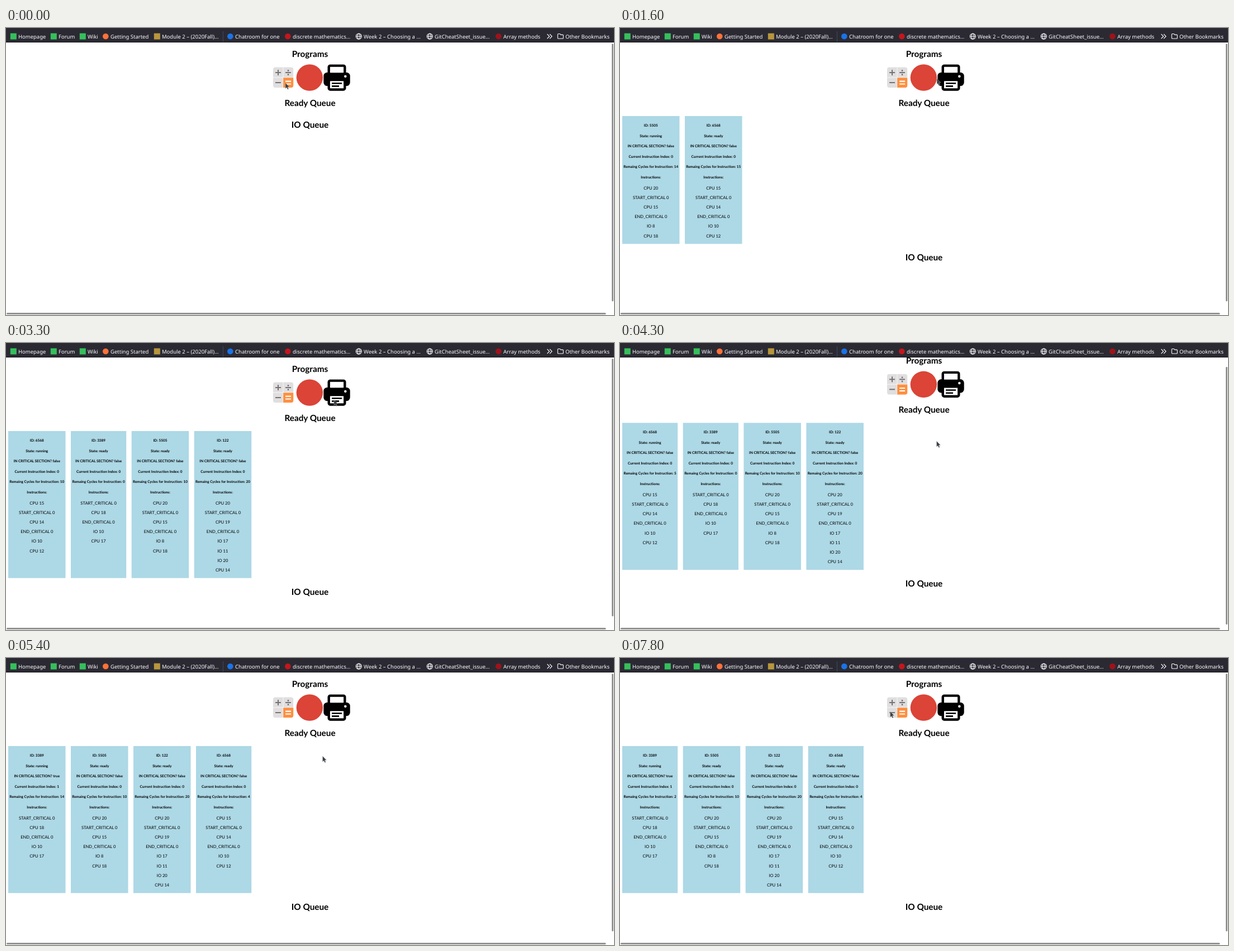
Recreate the animation shown at these times as an HTML page. Size 1088x515 px, loop 8000 ms.

```html
<!DOCTYPE html>
<html lang="en">
<head>
<meta charset="utf-8">
<title>Process queues</title>
<style>
  html, body { margin: 0; width: 100%; height: 100%; overflow: hidden; background: #fff; }
  svg { display: block; width: 1088px; height: 515px; text-rendering: geometricPrecision; }
  #page { font-family: Lato, "Noto Sans", sans-serif; text-anchor: middle; }
  .head { font-size: 15.3px; font-weight: 700; }
  .info { font-size: 6.45px; font-weight: 700; }
  .code { font-size: 7.6px; }
  #bar text { font: 9.5px "Noto Sans", sans-serif; fill: #fbfbfe; }
  .line { fill: none; stroke: #fbfbfe; stroke-width: 1.1; }
  .sheet { fill: #fff; stroke: #000; stroke-width: 4.4; }
</style>
</head>
<body>
<svg viewBox="0 0 1088 515">
  <defs>
    <rect id="square" x="-5.5" y="-5.5" width="11" height="11"/>
    <circle id="dot" r="5.3"/>
    <g id="globe" class="line">
      <circle r="5"/><ellipse rx="2.2" ry="5"/><path d="M-5 0H5"/>
    </g>
    <path id="folder" class="line" d="M-5-3.5a1 1 0 0 1 1-1h3l1.3 1.6H4a1 1 0 0 1 1 1V3a1 1 0 0 1-1 1H-4a1 1 0 0 1-1-1Z"/>
    <clipPath id="keys"><rect x="478" y="70.5" width="36.2" height="36.6" rx="4"/></clipPath>
  </defs>

  <g id="page">
    <text class="head" x="544" y="51.8">Programs</text>
    <!-- calculator -->
    <g clip-path="url(#keys)">
      <rect x="478" y="70" width="37" height="38" fill="#e0dede"/>
      <path d="M496 70V108M478 88.9H515" stroke="#fff" stroke-width=".8"/>
      <rect x="496.2" y="89.2" width="19" height="19" fill="#ff8f3f"/>
    </g>
    <path d="M482 80H492M487 75V85M500 80H510M482 98H492" stroke="#737373" stroke-width="2"/>
    <path d="M505 75.1V77.7M505 82.3V84.9" stroke="#737373" stroke-width="2.4"/>
    <path d="M500 95.7H510M500 100.5H510" stroke="#fff" stroke-width="2.2"/>
    <!-- browser -->
    <circle cx="543.3" cy="89" r="23.7" fill="#db4437"/>
    <!-- printer -->
    <rect x="568.3" y="79.7" width="47.4" height="24.4" rx="6.5"/>
    <rect class="sheet" x="577.7" y="67.6" width="28.6" height="15" rx="2.5"/>
    <rect class="sheet" x="577.7" y="93" width="28.6" height="17.5" rx="2.5"/>
    <rect x="575.5" y="80.5" width="33" height="12.5"/>
    <path d="M583 99.2H601M583 104.4H596" stroke="#000" stroke-width="2.6"/>
    <circle cx="607.3" cy="86.7" r="2.2" fill="#fff"/>

    <text class="head" x="544" y="139.8">Ready Queue</text>
    <g id="cards"></g>
    <text class="head" id="io" x="544" y="179">IO Queue</text>
  </g>

  <rect id="thumb" x="1084" y="28" width="3" height="462.5" rx="1.5" fill="#929292"/>
  <rect x="1" y="511" width="1072.5" height="3" rx="1.5" fill="#929292"/>

  <g id="bar">
    <rect width="1088" height="26" fill="#2b2a33"/>
    <rect y="25.4" width="1088" height=".6" fill="#0c0c0d"/>
    <path d="M388.5 6V25" stroke="#3d4a60"/>
    <path class="line" d="M968.5 11l4 4-4 4M973 11l4 4-4 4"/>
  </g>

  <path id="cursor" d="M0 0V10.2L2.3 8.2 4 11.7 5.7 10.9 4.1 7.5 7 7.2Z"
        fill="#3a3f45" stroke="#d8d8d8" stroke-width=".4"/>
</svg>

<script>
const $ = id => document.getElementById(id);
const text = (cls, x, y, s) => `<text class="${cls}" x="${x}" y="${y}">${s}</text>`;

const bookmarks = [
  [22, 'Homepage', 'square', '#35bf5c'],
  [94, 'Forum', 'square', '#35bf5c'],
  [146, 'Wiki', 'square', '#35bf5c'],
  [187, 'Getting Started', 'dot', '#ff7139'],
  [279, 'Module 2 – (2020Fall)…', 'square', '#b8963c'],
  [410, 'Chatroom for one', 'dot', '#1a73e8'],
  [513, 'discrete mathematics…', 'dot', '#c4161c'],
  [640, 'Week 2 – Choosing a …', 'globe'],
  [767, 'GitCheatSheet_issue…', 'globe'],
  [890, 'Array methods', 'dot', '#a01219'],
  [1001, 'Other Bookmarks', 'folder']
];
$('bar').insertAdjacentHTML('beforeend', bookmarks.map(([x, label, icon, color]) =>
  `<use href="#${icon}" x="${x - 8.7}" y="15" fill="${color}"/>` + text('', x, 18.8, label)).join(''));

const LOOP = 8000, TICK = 200, TOP = 158;

// The screen refreshes every tick within these spans and stalls between them
const spans = [[0, 0], [600, 2400], [2900, 4900], [5200, 6000], [6300, 6700], [7000, 7800]];

function lastRefresh(time) {
  const [from, to] = spans.findLast(s => s[0] <= time);
  return Math.min(to, time - (time - from) % TICK);
}

// Pointer moves: start, end, destination
const moves = [
  [1000, 1900, 590.5, 88], [3100, 3900, 566.5, 176],
  [6100, 6700, 516.5, 101.5], [6800, 7600, 483.5, 96]
];

function pointer(t) {
  let x = 500, y = 98.5;
  for (const [from, to, toX, toY] of moves) {
    const k = Math.min(1, Math.max(0, (t - from) / (to - from)));
    const ease = k * k * (3 - 2 * k);
    x += (toX - x) * ease;
    y += (toY - y) * ease;
  }
  return [x, y];
}

const section = (n, ...rest) => ['START_CRITICAL 0', 'CPU ' + n, 'END_CRITICAL 0', ...rest];

// Each turn lasts until a given time and leaves `end` cycles
const processes = [
  { id: 5505, born: 600, start: 20, until: 2400, end: 10,
    code: ['CPU 20', ...section(15, 'IO 8', 'CPU 18')] },
  { id: 6568, born: 800, start: 15, until: 4400, end: 4,
    code: ['CPU 15', ...section(14, 'IO 10', 'CPU 12')] },
  { id: 3389, born: 2200, start: 0, until: 7900, end: 1,
    code: section(18, 'IO 10', 'CPU 17') },
  { id: 122, born: 3100, start: 20, until: Infinity, end: 0,
    code: ['CPU 20', ...section(19, 'IO 17', 'IO 11', 'IO 20', 'CPU 14')] }
];

// A process whose turn is over goes to the back of the queue
function queueAt(t) {
  const joined = p => t > p.until ? p.until : p.born;
  return processes.filter(p => t >= p.born).sort((a, b) => joined(a) - joined(b));
}

function cyclesLeft(p, running, t) {
  if (t > p.until) return p.end;
  return running ? p.end + Math.ceil((p.until - t) / TICK) : p.start;
}

function drawCards(t) {
  const queue = queueAt(t);
  const rows = Math.max(0, ...queue.map(p => p.code.length));
  const height = 126.2 + 17.2 * rows;
  let x = 4, out = '';
  queue.forEach((p, i) => {
    const running = i === 0;
    const critical = running && p.code[0].startsWith('START');
    const left = cyclesLeft(p, running, t);
    const width = 95.9 + 3.3 * String(left).length;
    const mid = x + width / 2;
    const info = [
      'ID: ' + p.id,
      'State: ' + (running ? 'running' : 'ready'),
      'IN CRITICAL SECTION? ' + critical,
      'Current Instruction Index: ' + Number(critical),
      'Remaing Cycles for Instruction: ' + left,
      'Instructions:'
    ];
    out += `<rect x="${x}" y="${TOP}" width="${width}" height="${height}" fill="#add8e6"/>`
      + info.map((s, r) => text('info', mid, TOP + 19 + 18.5 * r, s)).join('')
      + p.code.map((s, r) => text('code', mid, TOP + 131.6 + 17.2 * r, s)).join('');
    x += width + 9.5;
  });
  $('cards').innerHTML = out;
  $('io').setAttribute('y', rows ? TOP + height + 30 : 179);
}

let shown = -1;
function frame(now) {
  const t = lastRefresh(now % LOOP);
  if (t !== shown) {
    shown = t;
    const scroll = t >= 4100 && t < 5200 ? 14.7 : 0;
    drawCards(t);
    $('page').setAttribute('transform', `translate(0 ${-scroll})`);
    $('thumb').setAttribute('y', 28 + scroll);
    $('cursor').setAttribute('transform', `translate(${pointer(t)})`);
  }
  requestAnimationFrame(frame);
}
frame(0);
</script>
</body>
</html>
```
